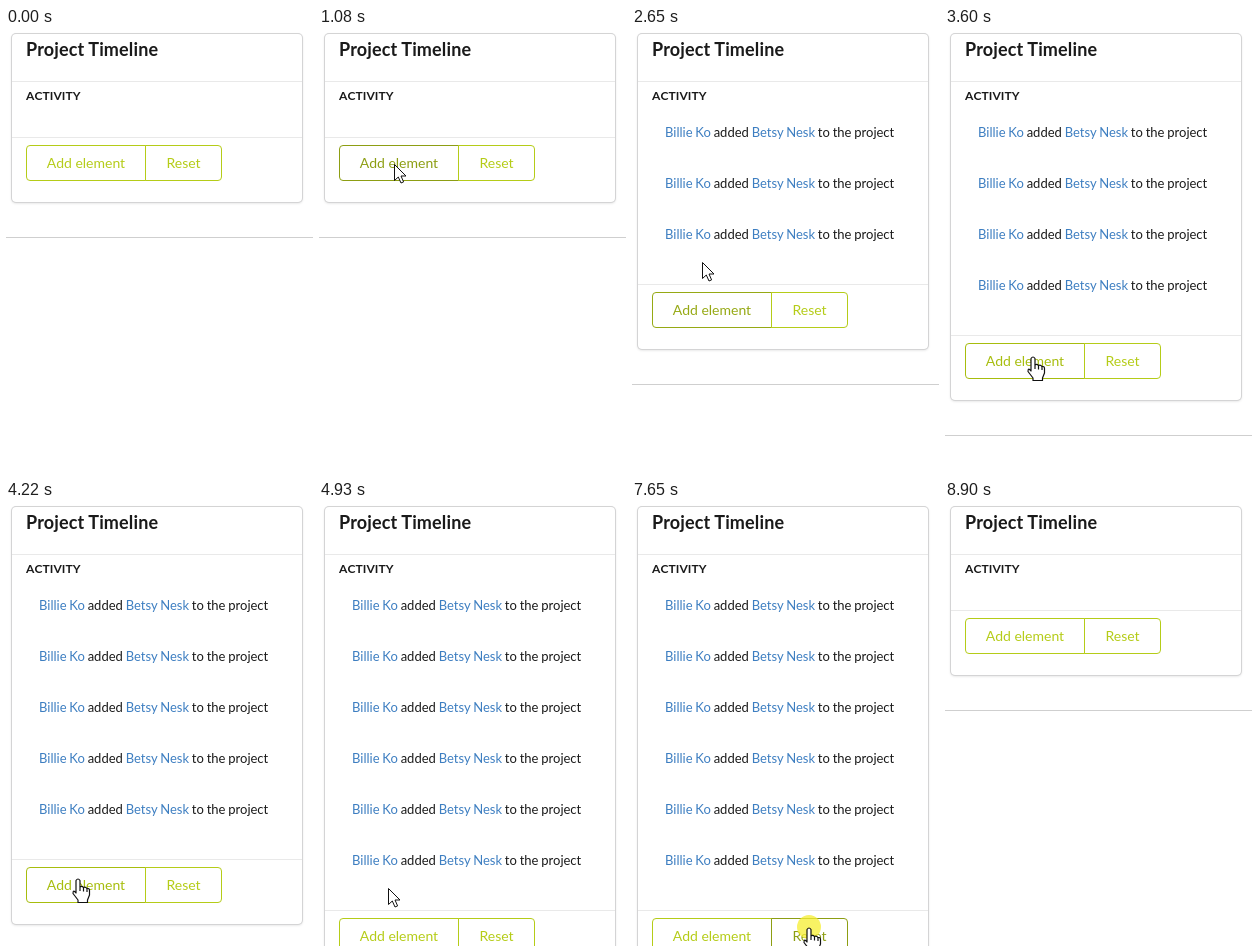
These frames come from a looping animation (307 by 445 pixels, 9210 ms). An HTML page:

```html
<!DOCTYPE html>
<html lang="en">
<head>
<meta charset="utf-8">
<title>Project Timeline</title>
<style>
  html, body { margin: 0; width: 100%; height: 100%; overflow: hidden; background: #fff; }
  body { position: relative; font: 14px/20px Lato, sans-serif; color: #1a1a1a; --grow: 0px; }
  body > *, .card > * { position: absolute; white-space: nowrap; }
  .card {
    left: 6px; top: 6px; width: 290px; height: calc(168px + var(--grow));
    border-radius: 4px; box-shadow: 0 1px 3px 0 #d4d4d5, 0 0 0 1px #d4d4d5;
  }
  .title { left: 14px; top: 5px; font-size: 18px; font-weight: 700; letter-spacing: .14px; }
  .sub { left: 14px; top: 52px; font-size: 12px; font-weight: 700; letter-spacing: .1px; font-kerning: none; }
  .line { left: 0; top: 47px; width: 290px; height: 1px; background: #e9e9e9; }
  .low { top: calc(103px + var(--grow)); }
  .item { left: 27px; font-size: 13px; word-spacing: -.5px; visibility: hidden; }
  .item b { font-weight: 400; color: #3d7ec1; }
  .buttons { left: 14px; top: calc(111px + var(--grow)); display: flex; }
  .button {
    box-sizing: border-box; width: 120px; height: 36px; line-height: 34px;
    border: 1px solid; border-radius: 4px 0 0 4px; text-align: center; color: #b5cc18;
  }
  .button + .button { width: 77px; margin-left: -1px; border-radius: 0 4px 4px 0; }
  .rule { left: 0; top: calc(209px + var(--grow)); width: 100%; height: 1px; background: #cfcfcf; }
  #pointer { left: 0; top: -1px; width: 1px; height: 1px; overflow: visible; }
</style>
</head>
<body>
<div class="card">
  <div class="title">Project Timeline</div>
  <div class="line"></div>
  <div class="sub">ACTIVITY</div>
  <div class="line low"></div>
  <div class="buttons">
    <div class="button" id="add">Add element</div>
    <div class="button" id="reset">Reset</div>
  </div>
</div>
<div class="rule"></div>
<svg id="pointer">
  <circle id="halo" r="12" cy="-1" fill="#f5ee30" opacity=".75"/>
  <path id="arrow" fill="#fff" stroke="#111" d="M.5 .5V16.5L4.3 13L7 19L9.6 17.9L7 12H12Z"/>
  <path id="hand" fill="#fff" stroke="#111" stroke-width="1.2" stroke-linejoin="round"
    d="M-2 14V1.5Q0-1.5 2 1.5V8Q4 6.6 5.5 8.6Q7.5 7.4 9 9.6Q11.5 9 11.5 11.5V16L9.5 21V23.5H0V21L-5 14.5Q-5 10-2 14ZM2 8V12M5.5 8.6V12.5M9 9.6V13"/>
</svg>
<script>
const LOOP = 9210, ENTER = 370, LEAVE = 8890, FRAME = 78.6;
const MOVE = 480, PRESS = 150, FLASH = 80;
const ADDS = [1150, 2000, 2570, 3350, 4060, 4770], RESET = 7730;

// pointer moves: start time and destination
const moves = [
  [ENTER, 75, 137], [1240, 70, 180], [2020, 70, 235], [2650, 106, 292],
  [3440, 83, 341], [4060, 69, 388], [5231, 76, 428], [6781, 177, 428],
  [8111, 254, 364], [8500, 126, 450]
];

const $ = id => document.getElementById(id);
const clamp = v => Math.max(0, Math.min(1, v));
const within = (v, a, b) => v >= a && v < b;
const mix = (a, b, u) => a + (b - a) * u;
const show = (id, on) => $(id).style.display = on ? '' : 'none';

const card = document.querySelector('.card');
const items = ADDS.map((_, i) => {
  const item = document.createElement('div');
  item.className = 'item';
  item.style.top = 88 + 51 * i + 'px';
  item.innerHTML = '<b>Billie Ko</b> added <b>Betsy Nesk</b> to the project';
  return card.appendChild(item);
});

function pointerAt(t) {
  let x = 290, y = 172;
  for (const [start, toX, toY] of moves) {
    const ease = 1 - (1 - clamp((t - start) / MOVE)) ** 4;
    x = mix(x, toX, ease);
    y = mix(y, toY, ease);
  }
  return [x, y];
}

// held down before a click takes effect, fading soon after
const pressure = (t, click) => t < click - PRESS ? 0 : clamp(1 - (t - click - 60) / 90);

function tint(button, over, press) {
  const idle = over ? [167, 189, 13] : [181, 204, 24];
  const pressed = [141, 158, 19];
  button.style.color = `rgb(${idle.map((c, i) => Math.round(mix(c, pressed[i], press)))})`;
}

function draw(t) {
  const count = t < RESET ? ADDS.filter(a => a <= t).length : 0;
  const grow = count ? 51 * count - 6 : 0;
  document.body.style.setProperty('--grow', grow + 'px');
  items.forEach((item, i) => item.style.visibility = i < count ? 'visible' : 'hidden');

  const step = Math.floor((t - ENTER) / FRAME + 0.1);
  const [x, y] = pointerAt(ENTER + step * FRAME);
  const shown = within(t, ENTER, LEAVE);
  const level = shown && within(y, 117 + grow, 153 + grow);
  const overAdd = level && within(x, 20, 139), overReset = level && within(x, 139, 216);
  tint($('add'), overAdd, Math.max(...ADDS.map(a => pressure(t, a))));
  tint($('reset'), overReset, pressure(t, RESET));

  const click = [...ADDS, RESET].find(c => within(t, c - PRESS, c));
  const flash = click && t < click - PRESS + FLASH;
  const hand = (overAdd || overReset) && (!click || flash);
  $('pointer').style.transform = `translate(${Math.round(x)}px, ${Math.round(y)}px)`;
  show('pointer', shown);
  show('hand', hand);
  show('arrow', !hand);
  show('halo', flash);
}

const begin = performance.now();
function tick() {
  draw((performance.now() - begin) % LOOP);
  requestAnimationFrame(tick);
}
tick();
</script>
</body>
</html>
```
